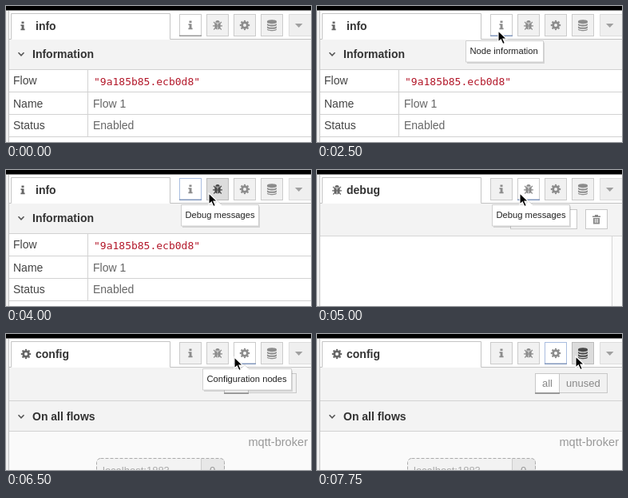
An HTML page for the animation above (8000 ms loop, 382 by 170 pixels).

```html
<!DOCTYPE html>
<html lang="en">
<head>
<meta charset="utf-8">
<title>Sidebar tabs</title>
<style>
html, body { margin: 0; width: 382px; height: 170px; overflow: hidden; background: #fff; }
svg { display: block; }
text { font: 14px "Liberation Sans", Arial, sans-serif; fill: #444; }
.bold { font-weight: bold; fill: #333; }
.value { fill: #666; }
.code { font: 13px "DejaVu Sans Mono", monospace; fill: #b3182a; }
.small { font-size: 13px; fill: #888; }
.tip { font-size: 11.2px; fill: #222; }
.line { fill: none; stroke: #c4c4c4; }
.box { fill: #fff; stroke: #c8c8c8; }
.bar { fill: #f3f3f3; }
.tab { --ink: #8c8c8c; }
.tab .face { fill: #f1f1f1; stroke: #cbcbcb; }
.tab .under { fill: none; }
.tab.on .face { fill: #fff; }
.tab.on .under { fill: #999; }
.tab.lit .under { fill: #8197bd; }
.tab.focus .face { stroke: #a9bddf; }
.tab.hover:not(.on) .face { fill: #dcdcdc; stroke: #bbb; }
.tab.hover:not(.on) { --ink: #484848; }
use, .icon { color: var(--ink, #666); }
</style>
</head>
<body>
<svg width="382" height="170" viewBox="0 0 382 170">
  <defs>
    <path id="info" fill="currentColor" d="M-1.5-5.5h3v2.4h-3zM-2.5-1.8h4v5.2h1.1v1.8h-5.2V3.4h1.2V0h-1.1z"/>
    <g id="bug">
      <path fill="none" stroke="currentColor" stroke-width="1.2" d="M-6 .8H6M-5-4l3 2.6M5-4l-3 2.6M-4.8 5.5l2.6-2.6M4.8 5.5l-2.6-2.6"/>
      <path fill="currentColor" d="M-2.7-3.2a2.7 2.8 0 0 1 5.4 0zM-3.6-2.4h3.2v8q-3.2-.5-3.2-4zM3.6-2.4H.4v8q3.2-.5 3.2-4z"/>
    </g>
    <g id="gear" fill="none" stroke="currentColor">
      <circle r="3.4" stroke-width="2.8"/>
      <circle r="5.2" stroke-width="2" pathLength="16" stroke-dasharray="1" stroke-dashoffset=".5"/>
    </g>
    <path id="data" fill="currentColor" d="M-6-4.6c0-2.8 12-2.8 12 0v.8c0 2.6-12 2.6-12 0zM-6-2c2 2 10 2 12 0v1.6c0 2.6-12 2.6-12 0zM-6 1.3c2 2 10 2 12 0v1.6c0 2.6-12 2.6-12 0zM-6 4.5c2 2 10 2 12 0v.8c0 2.6-12 2.6-12 0z"/>
    <path id="chevron" fill="none" stroke="#555" stroke-width="1.6" d="M-3.5-1.7L0 1.8 3.5-1.7"/>
  </defs>

  <rect width="3" height="170" fill="#f0f0f0"/>
  <rect width="382" height="5.5"/>
  <path class="line" d="M3.5 6v164M3 41.5h3.500V9.500h199v32H382"/>

  <g class="panel">
    <use href="#info" x="21" y="25"/>
    <text class="bold" x="37" y="30">info</text>
    <rect class="bar" x="4" y="42" width="378" height="37"/>
    <use href="#chevron" x="19" y="60"/>
    <text class="bold" x="33" y="65">Information</text>
    <path class="line" d="M4 79.500h378M4 107.500h378M4 135.500h378M4 163.500h378M102.500 80v83" style="stroke:#d2d2d2"/>
    <text x="9" y="98">Flow</text>
    <text x="9" y="127">Name</text>
    <text x="9" y="154">Status</text>
    <text class="code" x="110" y="99">"9a185b85.ecb0d8"</text>
    <text class="value" x="109" y="127">Flow 1</text>
    <text class="value" x="109" y="154">Enabled</text>
  </g>

  <g class="panel">
    <use href="#bug" x="25" y="25"/>
    <text class="bold" x="37" y="30">debug</text>
    <rect class="bar" x="4" y="42" width="378" height="40"/>
    <rect x="369" y="83" width="13" height="87" fill="#fafafa"/>
    <path class="line" d="M4 82.500h378M369.500 83v87" style="stroke:#d6d6d6"/>
    <rect class="box" x="242.500" y="49.500" width="83" height="24"/>
    <path fill="#888" d="M250 57h11l-4 4.800v6l-3-2.200v-3.800z"/>
    <text class="small" x="265" y="66">all nodes</text>
    <rect class="box" x="336.500" y="49.500" width="27" height="24"/>
    <path fill="#888" d="M345 57.500h3v-1.500h4v1.500h3v1.500h-10zM346 60h8v7.500h-8z"/>
    <path stroke="#fff" stroke-width=".8" d="M348.300 61v5M350 61v5M351.700 61v5"/>
  </g>

  <g class="panel">
    <use href="#gear" x="25" y="25"/>
    <text class="bold" x="37" y="30">config</text>
    <rect class="bar" x="4" y="42" width="378" height="79"/>
    <rect x="4" y="122" width="378" height="48" fill="#fafafa"/>
    <path class="line" d="M4 83.500h378M4 121.500h378" style="stroke:#d2d2d2"/>
    <rect class="box" x="303.500" y="49.500" width="60" height="24" style="fill:#f1f1f1"/>
    <rect class="box" x="273.500" y="49.500" width="30" height="24"/>
    <rect x="273" y="73" width="31" height="2" fill="#999"/>
    <text class="small" x="282" y="66">all</text>
    <text class="small" x="312" y="66">unused</text>
    <use href="#chevron" x="19" y="103"/>
    <text class="bold" x="33" y="108">On all flows</text>
    <text x="378" y="140" text-anchor="end" style="font-size:14.6px;fill:#999">mqtt-broker</text>
    <path fill="#e4e4e4" d="M244 156h26q4 0 4 4v10h-30z"/>
    <rect x="113.500" y="155.500" width="160" height="30" rx="5" fill="#eee" fill-opacity=".5" stroke="#aaa" stroke-dasharray="4 2"/>
    <path stroke="#ccc" d="M244.500 156v14"/>
    <text class="small" x="121" y="175" style="fill:#aaa">localhost:1883</text>
    <text class="small" x="255" y="175" style="fill:#999">0</text>
  </g>

  <g id="tabs"></g>
  <rect x="354" y="10" width="28" height="28" fill="#efefef"/>
  <path class="line" d="M382 10.500h-27.500v27H382" style="stroke:#ddd"/>
  <path fill="#a0a0a0" d="M362 22h9.500l-4.750 5z"/>

  <g id="tips"></g>
  <path id="cursor" stroke="#fff" stroke-width="1.1" d="M0 0v14l3.300-3 2.500 5.500 2.500-1.100L5.900 10h4.600z"/>
</svg>
<script>
const $ = id => document.getElementById(id);
const LOOP = 8000;

// start, open panel, hovered tab, ring around tab, tooltip, tooltip opacity, cursor x, y
const steps = [
  [0, 0, -1, 0, -1, 0],
  [750, 0, 0, 0, -1, 0],
  [1250, 0, 0, 0, -1, 0, 221, 151],
  [1500, 0, 0, 0, -1, 0, 228, 59],
  [1750, 0, 0, 0, -1, 0, 227, 37],
  [2000, 0, 0, 0, -1, 0, 227, 31],
  [2500, 0, 0, 0, 0, 1, 227, 31],
  [3250, 0, 1, 1, 0, .4, 253, 29],
  [3500, 0, 1, 1, -1, 0, 254, 29],
  [4000, 0, 1, 1, 1, 1, 254, 29],
  [5000, 1, 1, 0, 1, 1, 254, 29],
  [5750, 1, 2, 1, 1, .4, 284, 29],
  [6000, 1, 2, 1, -1, 0, 286, 29],
  [6500, 2, 2, 0, 2, 1, 286, 29],
  [7250, 2, 2, 0, 2, 1, 299, 29],
  [7500, 2, 3, 1, 2, .4, 321, 29],
  [7750, 2, 3, 1, -1, 0, 324, 28]
];

$("tabs").innerHTML = ["info", "bug", "gear", "data"].map((icon, i) =>
  `<g class="tab" transform="translate(${217 + 34 * i} 10)">
    <rect class="face" x=".5" y=".5" width="27" height="27"/>
    <rect class="under" y="26.500" width="28" height="1.500"/>
    <use href="#${icon}" x="14" y="14"/></g>`).join("");

$("tips").innerHTML = [
  ["Node information", 186, 98, 231],
  ["Debug messages", 219, 98, 265],
  ["Configuration nodes", 246, 112, 299]
].map(([label, x, w, tip]) => {
  const shape = `M${x + .5} 43.500H${tip - 5}l5-5 5 5H${x + w - .5}v26.500H${x + .5}z`;
  return `<g><path d="${shape}" transform="translate(1.500 2)" opacity=".13"/>
    <path d="${shape}" fill="#fff" stroke="#d0d0d0"/>
    <text class="tip" x="${x + 5.5}" y="60">${label}</text></g>`;
}).join("");

const panels = document.querySelectorAll(".panel");
const tabs = document.querySelectorAll(".tab");
const tips = $("tips").children;

function draw(now) {
  const t = now % LOOP;
  const [, open, hover, ring, tip, alpha, x, y] = steps.findLast(s => s[0] <= t);
  panels.forEach((p, i) => p.style.display = i === open ? "" : "none");
  tabs.forEach((tab, i) => {
    tab.classList.toggle("on", i === open);
    tab.classList.toggle("hover", i === hover);
    tab.classList.toggle("lit", i === open && hover >= 0);
    tab.classList.toggle("focus", i === open && ring === 1);
  });
  [...tips].forEach((g, i) => g.style.opacity = i === tip ? alpha : 0);
  $("cursor").style.display = x ? "" : "none";
  if (x) $("cursor").setAttribute("transform", `translate(${x} ${y})`);
}

const start = performance.now();
function frame() {
  draw(performance.now() - start);
  requestAnimationFrame(frame);
}
frame();
</script>
</body>
</html>
```
